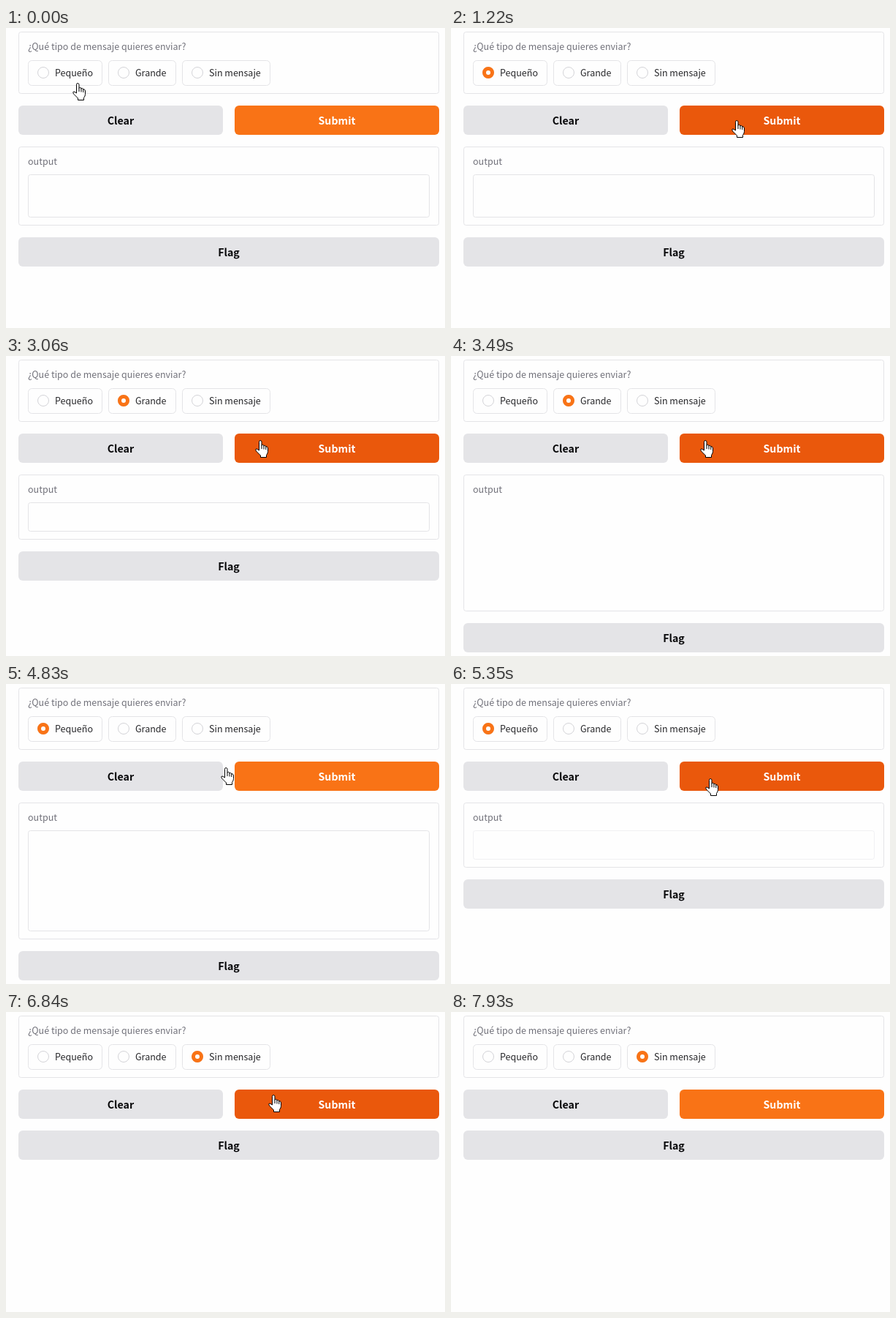
Animation, 601 px wide and 410 px high, one loop 8.36 s. Source, as an HTML page:

```html
<!DOCTYPE html>
<html lang="es">
<head>
<meta charset="utf-8">
<title>Formulario de mensajes</title>
<style>
html, body { margin: 0; width: 100%; height: 100%; overflow: hidden; background: #fefefe; }
svg { display: block; }
text { font: 12.53px "Noto Sans CJK JP", "Noto Sans CJK SC", "Noto Sans CJK KR", "Noto Sans", sans-serif; fill: #27272a; }
.label { fill: #71717a; }
.btn text { font-size: 14.2px; font-weight: 600; text-anchor: middle; fill: #09090b; }
.btn rect { fill: #e4e4e7; }
#clear.hover rect { fill: #d4d4d8; }
#submit text { fill: #fff; }
#submit rect { fill: #f97316; }
#submit.hover rect { fill: #ea580c; }
.line { fill: none; stroke: #e4e4e7; }
.ring { fill: #fefefe; stroke: #d4d4d8; }
.dot { fill: #fefefe; stroke: #f97316; stroke-width: 5; }
#cursor path { fill: #fff; stroke: #000; stroke-linejoin: round; }
</style>
</head>
<body>
<svg width="601" height="410" viewBox="0 0 601 410">
  <rect class="line" x="17.5" y="5.5" width="575" height="84" rx="3"/>
  <text class="label" x="30" y="30">¿Qué tipo de mensaje quieres enviar?</text>
  <g id="options"></g>
  <g id="buttons"></g>
  <g id="output">
    <rect class="line" id="panel" x="17.5" y="162.5" width="575" rx="3"/>
    <text class="label" x="30" y="187">output</text>
    <rect class="line" id="area" x="30.5" y="200.5" width="549" rx="3"/>
  </g>
  <g class="btn" id="flag">
    <rect x="17" width="576" height="40" rx="6"/>
    <text x="305" y="26">Flag</text>
  </g>
  <g id="cursor">
    <path id="hand" transform="translate(-7 0)" d="M5.5 14V2.500Q5.500 .5 7.200 .5T9 2.500V7.500Q9 6.300 10.500 6.300T12 8.200Q12.200 7.200 13.500 7.400T14.800 9.300Q15.200 8.600 16.200 8.900T17.500 11V15.500Q17.500 18 15.500 20.500V23.500H7.500V21L2 15.500Q.2 13.300 1 12.300Q2.500 11.200 5.500 14ZM9 7.500V12M12 8V12.500M14.800 9V13"/>
    <path id="arrow" d="M.5 .5V16.500L4.200 13L6.700 18.700L9.200 17.600L6.800 12.200H11.800Z"/>
  </g>
</svg>
<script>
const LOOP = 8360, STEP = 120;
const $ = id => document.getElementById(id);

// Each option sets the height of the output it produces.
const options = [
  { name: "Pequeño", x: 30, y: 44, w: 102, h: 35, result: 40 },
  { name: "Grande", x: 140, y: 44, w: 93, h: 35, result: 138 },
  { name: "Sin mensaje", x: 241, y: 44, w: 121, h: 35, result: 0 }
];
const buttons = [
  { id: "clear", name: "Clear", x: 17, y: 106, w: 280, h: 40 },
  { id: "submit", name: "Submit", x: 313, y: 106, w: 280, h: 40 }
];

// The pointer's journey: when it sets off, in how many steps, where to, and when it clicks there.
const stops = [
  { start: 0, steps: 1, x: 98, y: 75 },
  { start: 150, steps: 1, x: 65, y: 53, click: 300 },
  { start: 570, steps: 2, x: 200, y: 120 },
  { start: 830, steps: 4, x: 391, y: 126, click: 1600 },
  { start: 1975, steps: 4, x: 162, y: 57, click: 2510 },
  { start: 2910, steps: 1, x: 348, y: 115, click: 3490 },
  { start: 4030, steps: 4, x: 84, y: 51, click: 4700 },
  { start: 4830, steps: 3, x: 355, y: 129, click: 5220 },
  { start: 5610, steps: 3, x: 263, y: 57, click: 6020 },
  { start: 6290, steps: 1, x: 366, y: 113, click: 6710 },
  { start: 7400, steps: 4, x: 573, y: 398 },
  { start: 7930, steps: 1, x: 620, y: 430 }
];

$("options").innerHTML = options.map(({ name, x, y, w, h }) => `
  <rect class="line" x="${x + .5}" y="${y + .5}" width="${w - 1}" height="${h - 1}" rx="5"/>
  <circle class="ring" cx="${x + 21}" cy="61" r="7.5"/>
  <circle class="dot" cx="${x + 21}" cy="61" r="5.5"/>
  <text x="${x + 37}" y="66">${name}</text>`).join("");

$("buttons").innerHTML = buttons.map(({ id, name, x, y, w, h }) => `
  <g class="btn" id="${id}">
    <rect x="${x}" y="${y}" width="${w}" height="${h}" rx="6"/>
    <text x="${x + w / 2}" y="${y + 26}">${name}</text>
  </g>`).join("");

const dots = document.querySelectorAll(".dot");
const show = (el, on) => el.setAttribute("visibility", on ? "visible" : "hidden");
const easeOut = p => 1 - (1 - p) ** 4;

function pointerAt(t) {
  const i = stops.findLastIndex(s => s.start <= t);
  const to = stops[i], from = stops[Math.max(i - 1, 0)];
  const step = Math.floor((t - to.start) / STEP) + 1;
  const p = easeOut(Math.min(step / to.steps, 1));
  return { x: from.x + (to.x - from.x) * p, y: from.y + (to.y - from.y) * p };
}

const under = p => [...options, ...buttons].find(b =>
  p.x >= b.x && p.x < b.x + b.w && p.y >= b.y && p.y < b.y + b.h);

// Replays all clicks up to time t.
function formAt(t) {
  const form = { chosen: null, height: 59, since: -LOOP };
  for (const stop of stops.filter(s => s.click <= t)) {
    const hit = under(stop);
    if (options.includes(hit)) form.chosen = hit;
    else Object.assign(form, { height: form.chosen.result, since: stop.click });
  }
  return form;
}

function draw() {
  const t = performance.now() % LOOP;

  const { chosen, height, since } = formAt(t);
  dots.forEach((dot, i) => show(dot, options[i] === chosen));
  show($("output"), height);
  $("panel").setAttribute("height", height + 48);
  $("area").setAttribute("height", Math.max(height - 1, 0));
  $("area").setAttribute("opacity", Math.min(Math.floor((t - since) / STEP) / 2, 1));
  $("flag").setAttribute("transform", `translate(0 ${height ? height + 227 : 162})`);

  // Hover and pointer shape react one step late.
  const hovered = under(pointerAt(Math.max(t - STEP, 0)));
  for (const b of buttons) $(b.id).classList.toggle("hover", b === hovered);
  show($("hand"), hovered);
  show($("arrow"), !hovered);
  const { x, y } = pointerAt(t);
  $("cursor").setAttribute("transform", `translate(${Math.round(x)} ${Math.round(y)})`);

  requestAnimationFrame(draw);
}
draw();
</script>
</body>
</html>
```
